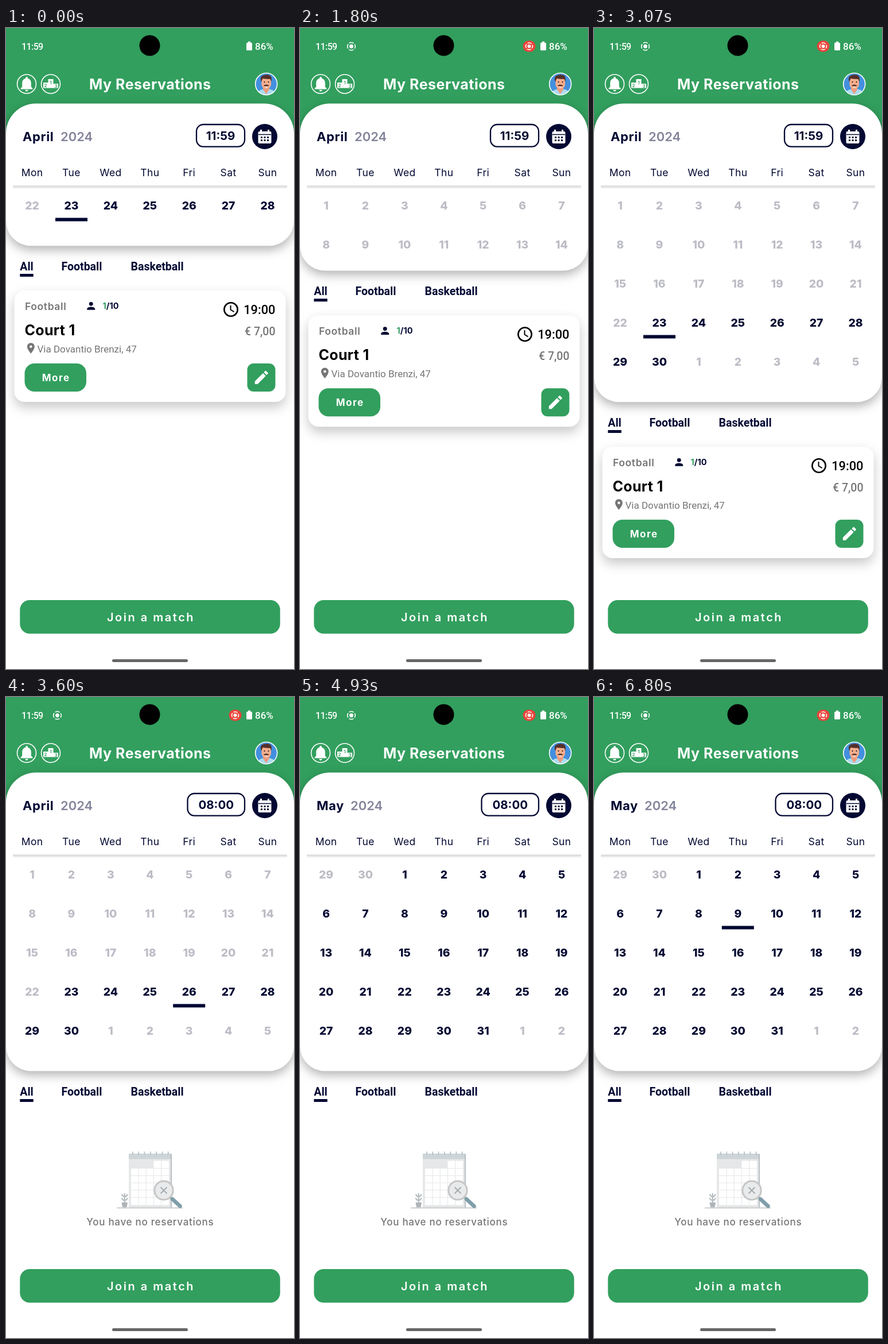
An HTML page that plays this animation: 502 by 1116 pixels, repeating every 6870 ms.

```html
<!DOCTYPE html>
<html lang="en">
<head>
<meta charset="utf-8">
<title>My Reservations</title>
<style>
  html, body { margin: 0; width: 100%; height: 100%; overflow: hidden; background: #fff; }
  svg { display: block; }
  text { font: 600 17px Inter, sans-serif; fill: #020832; white-space: pre; }
  .roboto { font-family: Roboto, sans-serif; }
  .mid { text-anchor: middle; }
  .end { text-anchor: end; }
  text.white, .white { fill: #fff; }
  .green { fill: #329f5e; }
  .navy { fill: #020832; }
  text.gray, .gray { fill: #757575; }
  text.black { fill: #000; }
  .status { font-size: 16px; font-weight: 500; }
  .head { font-size: 22px; font-weight: 700; letter-spacing: .6px; }
  .weekday { font-size: 17.5px; font-weight: 400; letter-spacing: .4px; }
  .day { font-size: 19.3px; font-weight: 800; }
  .off { fill: #bcbcc6; }
  .tab { font-size: 19.5px; font-weight: 700; }
  .podium text { font-size: 8px; fill: #329f5e; }
  .line { fill: none; stroke: #fff; stroke-width: 1.6; }
  #panel { filter: drop-shadow(0 7px 9px rgba(0, 0, 0, .3)); }
  #card { filter: drop-shadow(0 9px 10px rgba(0, 0, 0, .22)); }
</style>
</head>
<body>
<svg id="stage" width="100%" height="100%" viewBox="0 0 502 1116">
  <defs>
    <linearGradient id="fade" x2="0" y2="1">
      <stop stop-color="#d2d2d4"/><stop offset="1" stop-color="#fff"/>
    </linearGradient>
    <clipPath id="face"><circle cx="453.7" cy="97.5" r="18.5"/></clipPath>
  </defs>

  <rect class="green" width="502" height="186"/>

  <!-- status bar -->
  <text class="roboto status white" x="27" y="37.5" letter-spacing="-.6">11:59</text>
  <circle cx="250.5" cy="30.5" r="18"/>
  <path class="white" d="M422 23.5h4v2h1.5q1.5 0 1.5 1.5v10.500q0 1.500-1.500 1.500h-7q-1.500 0-1.500-1.500V27q0-1.500 1.500-1.500h1.500z"/>
  <text class="roboto status white" x="434" y="37.5" style="font-size:17px">86%</text>
  <g id="recording">
    <circle class="line" cx="89.5" cy="32" r="6.8" stroke-dasharray="8.2 2.48" stroke-dashoffset="4.1"/>
    <circle class="white" cx="89.5" cy="32" r="3.4"/>
    <rect x="388.5" y="22" width="22" height="19.5" rx="9.7" fill="#e8443a"/>
    <circle class="line" cx="399.5" cy="31.8" r="6" stroke-dasharray="7.2 2.22" stroke-dashoffset="3.6"/>
    <circle class="white" cx="399.5" cy="31.8" r="3"/>
  </g>

  <!-- header -->
  <circle class="line" cx="36" cy="97.5" r="16.5"/>
  <circle class="line" cx="78" cy="97.5" r="16.5"/>
  <path class="white" transform="translate(20.4 81.7) scale(1.3)" d="M12 22c1.100 0 2-.9 2-2h-4c0 1.100.9 2 2 2zm6-6v-5c0-3.070-1.630-5.640-4.500-6.320V4a1.500 1.500 0 00-3 0v.68C7.640 5.360 6 7.920 6 11v5l-2 2v1h16v-1l-2-2z"/>
  <path class="white" d="M65 95h8.500v-6h9v8H91v7.500H65z"/>
  <g class="mid podium">
    <text x="69" y="103">2</text>
    <text x="78" y="97.5">1</text>
    <text x="87" y="103.5">3</text>
  </g>
  <text class="mid white" x="251.3" y="107" style="font-size:25px;font-weight:700" letter-spacing=".5">My Reservations</text>
  <g clip-path="url(#face)">
    <rect x="434" y="78" width="40" height="40" fill="#4390df"/>
    <path d="M438 118q0-9 8-11l8-2 8 2q8 2 8 11z" fill="#a9dcf0"/>
    <path d="M448 101h11v6l-5.500 8-5.500-8z" fill="#ee9a7c"/>
    <rect x="445.5" y="85" width="16.500" height="21" rx="7.500" fill="#f7ae8d"/>
    <path d="M445 94q-3-9 2-11 6-3 12-1 5 1 3.500 12l-2-5q-7 0-13-1z" fill="#54312b"/>
    <path d="M448.500 100.500q5-4 10.500 0-5 2-10.500 0z" fill="#54312b"/>
    <path d="M451 102h5.500q-2.700 3-5.500 0z" fill="#fff"/>
    <circle cx="450.500" cy="94" r="1"/><circle cx="457.500" cy="94" r="1"/>
  </g>
  <circle class="line" cx="453.7" cy="97.5" r="19"/>

  <!-- calendar panel -->
  <path id="panel" class="white"/>
  <text id="month" class="head" x="29" y="197"></text>
  <text id="year" class="head" y="197" style="font-weight:600;fill:#83849a;letter-spacing:0">2024</text>
  <rect id="pill" y="168" height="38.6" rx="12" fill="#fff" stroke="#020832" stroke-width="2.3"/>
  <text id="clock" class="mid" y="195" style="font-size:20.5px;font-weight:700"></text>
  <circle class="navy" cx="451" cy="189" r="22"/>
  <path class="white" d="M443 177h3v3h10v-3h3v3h1q2.500 0 2.500 2.500v16q0 2.500-2.500 2.500h-18q-2.500 0-2.500-2.500v-16q0-2.500 2.500-2.500h1z"/>
  <path d="M440 185.500h22" stroke="#020832" stroke-width="1.5"/>
  <path d="M444 190.500h14M444 195.500h14" stroke="#020832" stroke-width="3" stroke-dasharray="3 2.5"/>
  <g id="weekdays"></g>
  <rect x="12" y="274.5" width="478" height="6" fill="url(#fade)"/>
  <svg id="days" y="277" width="502" height="71"></svg>

  <!-- everything that moves down with the panel -->
  <g id="below">
    <text class="roboto tab" x="24.3" y="422">All</text>
    <text class="roboto tab" x="96.5" y="422">Football</text>
    <text class="roboto tab" x="217.5" y="422">Basketball</text>
    <rect class="navy" x="24.3" y="428" width="23.4" height="5"/>
    <g id="booking">
      <rect id="card" class="white" x="14.5" y="457" width="473" height="194" rx="18"/>
      <text class="gray" x="33" y="491" style="font-size:17.5px" letter-spacing=".6">Football</text>
      <path class="navy" transform="translate(137.8 473.4) scale(.87)" d="M12 12a4 4 0 100-8 4 4 0 000 8zm0 2c-2.670 0-8 1.340-8 4v2h16v-2c0-2.660-5.330-4-8-4z"/>
      <text x="168.5" y="489" style="font-size:14.5px;font-weight:700"><tspan class="green">1</tspan>/10</text>
      <circle cx="392" cy="490" r="11.7" fill="none" stroke="#000" stroke-width="2.6"/>
      <path d="M391.500 483v7.500l6 3.600" fill="none" stroke="#000" stroke-width="2"/>
      <text class="roboto end black" x="469.5" y="497.5" style="font-size:21.8px;font-weight:500">19:00</text>
      <text class="black" x="32.5" y="535" style="font-size:25px;font-weight:700" letter-spacing=".3">Court 1</text>
      <text class="roboto end gray" x="469.5" y="534.5" style="font-size:19.5px;font-weight:500">€ 7,00</text>
      <path class="gray" transform="translate(32.3 546.5) scale(.92)" d="M12 2C8.130 2 5 5.130 5 9c0 5.250 7 13 7 13s7-7.750 7-13c0-3.870-3.130-7-7-7zm0 9.500a2.500 2.500 0 010-5 2.500 2.500 0 010 5z"/>
      <text class="roboto gray" x="54.5" y="565" style="font-weight:400">Via Dovantio Brenzi, 47</text>
      <rect class="green" x="32.5" y="584" width="107.5" height="49" rx="17"/>
      <text class="mid white" x="87.2" y="614.5" style="font-weight:700" letter-spacing="1.5">More</text>
      <rect class="green" x="420.5" y="584" width="49" height="49" rx="11"/>
      <path class="white" transform="translate(430 593) scale(1.28)" d="M3 17.250V21h3.750L17.810 9.940l-3.750-3.750zM20.710 7.040c.39-.39.39-1.020 0-1.410l-2.340-2.340c-.39-.39-1.020-.39-1.410 0l-1.830 1.830 3.750 3.750z"/>
    </g>
  </g>

  <!-- empty state -->
  <g id="empty">
    <rect x="214" y="796" width="74.5" height="93" fill="#e6e7e8"/>
    <rect x="214" y="795" width="74.5" height="9.5" fill="#cdd5d8"/>
    <path d="M288 796v93" stroke="#a9b2b6" stroke-width="1.5"/>
    <path d="M220 794.500h65" stroke="#b9c1c5" stroke-width="6" stroke-dasharray="1.8 8.5"/>
    <path class="white" d="M257.500 807.500H284v77h-66v-64h39.500z"/>
    <path d="M218 820.500h66m-66 12.700h66m-66 12.700h66m-66 12.700h66m-66 12.700h66M231 820.500v64m13.200-64v64m13.200-64v64m13.200-77v77" stroke="#e4e6e7"/>
    <path d="M193 889.500h115" stroke="#c9ced1" stroke-width="2"/>
    <path d="M201.500 880h10.500l-1.500 8.500h-7.500z" fill="#aeb5b9"/>
    <path d="M206.700 880v-16m-4.700 1.500q1 4 4.700 4.500 4-.5 5-4.500m-10 6.500q1 4 5 4.500 4-.5 5-4.500" fill="none" stroke="#b3babd" stroke-width="2.2"/>
    <path d="M286.500 871l4 3.500" stroke="#9aa5aa" stroke-width="3"/>
    <path d="M290 874l13.500 12.500" stroke="#7f9ea9" stroke-width="6.5" stroke-linecap="round"/>
    <circle cx="275" cy="859" r="16.2" fill="#e9eaeb" stroke="#c6c6c6" stroke-width="3"/>
    <path d="M269.500 853.500l11 11m0-11l-11 11" stroke="#a4adb1" stroke-width="2"/>
    <text class="mid gray" x="251.3" y="920" style="font-weight:500" letter-spacing=".7">You have no reservations</text>
  </g>

  <rect class="green" x="24.3" y="996" width="453.5" height="58.5" rx="17"/>
  <text class="mid white" x="252.5" y="1033" style="font-size:20px" letter-spacing="2.5">Join a match</text>
  <rect x="185" y="1099" width="132" height="5" rx="2.5" fill="#666"/>
</svg>

<script>
const LOOP = 6870, COL = 68.4, ROW = 68, WIDTH = 502;
const RECORD = 70, EXPAND = 1700, EXPAND_TIME = 400;
const PICK_APRIL = 3400, SWIPE = 4530, SWIPE_TIME = 300, PICK_MAY = 5530;

const $ = id => document.getElementById(id);
const set = (id, attrs) => {
  for (const name in attrs) $(id).setAttribute(name, attrs[name]);
};
const show = (id, on) => set(id, { visibility: on ? 'visible' : 'hidden' });
const progress = (t, start, length) => Math.min(1, Math.max(0, (t - start) / length));
const smooth = x => x * x * (3 - 2 * x);
const easeOut = x => 1 - (1 - x) ** 3;
const colX = i => 45.6 + COL * (i % 7);

$('weekdays').innerHTML = ['Mon', 'Tue', 'Wed', 'Thu', 'Fri', 'Sat', 'Sun']
  .map((name, i) => `<text class="mid weekday" x="${colX(i)}" y="258">${name}</text>`).join('');

// Five weeks; offset is the number of leading days from the previous month.
function monthGrid(id, offset, length, previous, firstOpen) {
  let days = '';
  for (let i = 0; i < 35; i++) {
    const n = i - offset + 1;
    const label = n < 1 ? n + previous : n > length ? n - length : n;
    const open = n >= firstOpen && n <= length;
    days += `<text class="mid day ${open ? '' : 'off'}" x="${colX(i)}" y="${39.3 + ROW * (i / 7 | 0)}">${label}</text>`;
  }
  return `<g id="${id}">${days}<rect id="${id}Mark" class="navy" width="56" height="6"/></g>`;
}
$('days').innerHTML = monthGrid('april', 0, 30, 31, 23) + monthGrid('may', 2, 31, 30, 1);

const mark = (id, i) => set(id, { x: colX(i) - 28, y: 53.5 + ROW * (i / 7 | 0) });

// Panel outline: wider rounding at the top than at the bottom.
const panelPath = bottom =>
  `M0 183.500a52 52 0 0152-52H450a52 52 0 0152 52V${bottom - 44}a44 44 0 01-44 44H44a44 44 0 01-44-44z`;

function draw(t) {
  const grow = 272 * smooth(progress(t, EXPAND, EXPAND_TIME));
  const slide = WIDTH * easeOut(progress(t, SWIPE, SWIPE_TIME));
  const picked = t >= PICK_APRIL, isMay = slide > WIDTH / 2;

  show('recording', t >= RECORD);
  set('panel', { d: panelPath(379.3 + grow) });
  set('days', { height: 71 + grow });
  set('below', { transform: `translate(0 ${grow})` });

  set('april', { transform: `translate(${-slide} ${t < EXPAND ? -3 * ROW : 0})` });
  set('may', { transform: `translate(${WIDTH - slide} 0)` });
  mark('aprilMark', picked ? 25 : 22);
  mark('mayMark', 10);
  show('mayMark', t >= PICK_MAY);

  $('month').textContent = isMay ? 'May' : 'April';
  set('year', { x: isMay ? 88 : 95 });
  $('clock').textContent = picked ? '08:00' : '11:59';
  set('clock', { x: picked ? 366.3 : 374 });
  set('pill', { x: picked ? 316.5 : 332, width: picked ? 99.5 : 84 });
  show('booking', !picked);
  show('empty', picked);
}

function tick() {
  draw(performance.now() % LOOP);
  requestAnimationFrame(tick);
}
tick();
</script>
</body>
</html>
```
